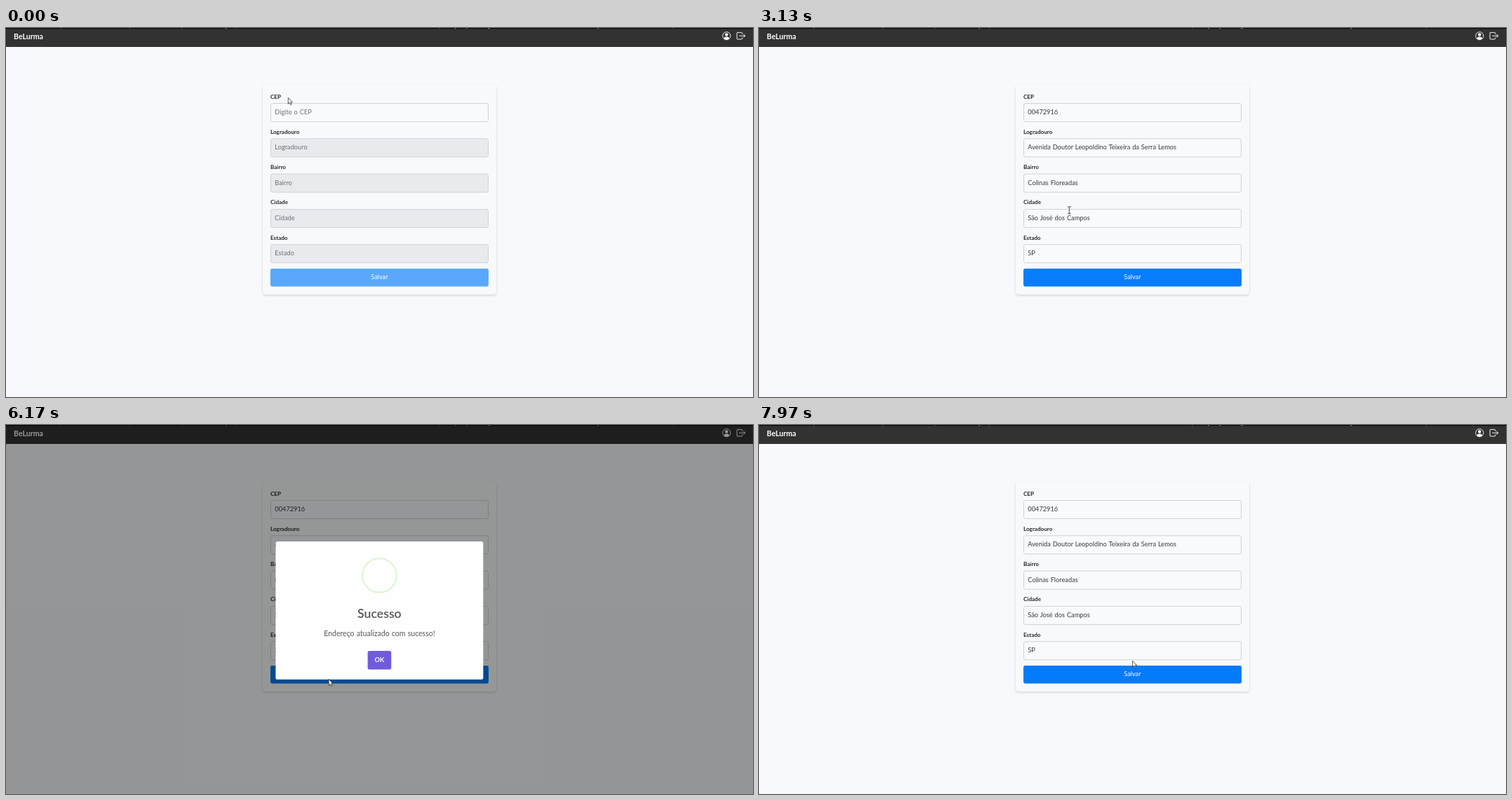
These frames come from a looping animation (1065x526 px, 8 s). An HTML page:

```html
<!DOCTYPE html>
<html lang="pt-BR">
<head>
<meta charset="utf-8">
<title>Endereço</title>
<style>
  html, body { margin: 0; width: 100%; height: 100%; overflow: hidden; background: #f7f9fc; }
  svg { display: block; width: 100vw; height: 100vh; }
  text { font-family: Lato, "Open Sans", sans-serif; word-spacing: .06em; white-space: pre; }
  .brand { font-size: 10.6px; font-weight: 700; fill: #fff; }
  .label { font-size: 8.1px; font-weight: 700; fill: #222529; }
  .value { font-size: 9.25px; }
  .mid { text-anchor: middle; }
</style>
</head>
<body>
<svg viewBox="0 0 1065 526">
  <defs>
    <filter id="soft" x="-5%" y="-5%" width="110%" height="112%">
      <feDropShadow dx="0" dy="1.4" stdDeviation="1.5" flood-color="#000" flood-opacity=".17"/>
    </filter>
  </defs>
  <rect width="1065" height="526" fill="#f7f9fc"/>

  <rect width="1065" height="27" fill="#323232"/>
  <rect width="1065" height="1.2" fill="#080808"/>
  <path d="M78 .5h1m97 0h1m73 0h1m62 0h2m13 0h1m288 0h1m22 0h2m14 0h2m29 0h3m153 0h2m106 0h1" stroke="#777" stroke-width="1"/>
  <text class="brand" x="11" y="15.6">BeLurma</text>
  <g fill="#fff">
    <circle cx="1027.3" cy="11.2" r="5.6" fill="none" stroke="#fff" stroke-width=".9"/>
    <circle cx="1027.3" cy="9.5" r="2.2"/>
    <path d="M1023.2 15.1c.6-1.8 2.1-2.6 4.1-2.6s3.5.8 4.1 2.6a5.8 5.8 0 0 1-8.2 0z"/>
  </g>
  <path d="M1049.6 8.6V7.2q0-.8-.8-.8h-5.9q-.8 0-.8.8v8q0 .8.8.8h5.9q.8 0 .8-.8v-1.4M1045.6 11.2h8.2M1051.6 9l2.2 2.2-2.2 2.2"
    fill="none" stroke="#fff" stroke-width=".95" stroke-linecap="round" stroke-linejoin="round"/>

  <rect x="366" y="81" width="333" height="298.7" rx="4.4" fill="#f8f9fa" filter="url(#soft)"/>
  <g id="form"></g>
  <rect id="save" x="377" y="343" width="311" height="25.4" rx="2.4"/>
  <text class="value mid" x="532.4" y="358.2" fill="#fff">Salvar</text>

  <rect id="shade" width="1065" height="526"/>
  <g id="popup">
    <rect x="390.2" y="169.8" width="284.4" height="189.2" rx="2.8" fill="#fefefe"/>
    <circle cx="532.4" cy="216.4" r="23.3" fill="none" stroke="#a5dc86" stroke-opacity=".33" stroke-width="2.2"/>
    <rect id="tip" fill="#a5dc86" rx="1.1"/>
    <rect id="long" fill="#a5dc86" rx="1.1"/>
    <text class="mid" x="532.4" y="275" font-size="17" font-weight="600" fill="#565656">Sucesso</text>
    <text class="mid" x="532.4" y="299.8" font-size="10.1" fill="#555">Endereço atualizado com sucesso!</text>
    <rect x="516.3" y="319.8" width="32.3" height="25.5" rx="2.2" fill="#705cda"/>
    <text class="mid" x="532.4" y="335" font-size="8.9" font-weight="700" fill="#fff">OK</text>
  </g>

  <g id="cursor" stroke-linejoin="round">
    <path id="arrow" d="M.3 .4V9.2L2.3 7.4 3.7 10.5 5.1 9.9 3.8 6.9H6.4z" fill="#fff" stroke="#222" stroke-width=".75"/>
    <path id="beam" d="M-2.4-5.2h1.7q.7 0 .7.7q0-.7.7-.7h1.7M-2.4 4.8h1.7q.7 0 .7-.7q0 .7.7.7h1.7M0-4.5V4.1" fill="none" stroke="#333" stroke-width=".9"/>
    <path id="hand" d="M-1 5.4V.7q0-.8.8-.8t.8.8v3l3.4.7q1 .2.9 1.2L4.5 9.3q-.2 1.2-1.2 1.2H.6L-2.8 7q-.4-.6.2-1 .5-.4 1.6.8z" fill="#fff" stroke="#222" stroke-width=".75"/>
  </g>
</svg>
<script>
const LOOP = 8000, STEP = 100 / 3;
const TYPE_FROM = 900, TYPE_TO = 1600, FOCUS = 600, BLUR = 2000, FILL = 2250;
const SHADE_IN = 6050, POP_IN = 6060, POP_OUT = 7560, POP_GONE = 7710;
const EM = 8.88;

const rows = [
  ['CEP', 'Digite o CEP', '00472916'],
  ['Logradouro', 'Logradouro', 'Avenida Doutor Leopoldino Teixeira da Serra Lemos'],
  ['Bairro', 'Bairro', 'Colinas Floreadas'],
  ['Cidade', 'Cidade', 'São José dos Campos'],
  ['Estado', 'Estado', 'SP']
];

// time, x, y
const path = [
  [0, 402, 99], [250, 402, 99], [600, 408, 110.5], [2550, 408, 110.5],
  [3133, 442.3, 260], [3700, 451, 326], [4150, 453, 328], [4633, 454.6, 369.6],
  [5050, 454.6, 369.6], [5400, 458.8, 362], [6067, 458.8, 362],
  [6700, 473.8, 360], [6933, 473.8, 360], [7400, 532.3, 335.8], [LOOP, 532.3, 335.8]
];

// time, button colour reached 150 ms later
const tints = [
  [-200, [90, 168, 251]], [FILL, [8, 125, 251]], [4320, [0, 105, 217]], [4570, [8, 125, 251]],
  [5170, [0, 105, 217]], [5650, [4, 92, 186]], [6067, [4, 123, 251]]
];

// share of the run, top, offset, width in em
const tipKeys = [[0, 1.19, .06, 0], [.54, 1.06, .13, 0], [.7, 2.19, -.38, 3.13], [.84, 3, 1.31, 1.06], [1, 2.875, .8125, 1.5625]];
const longKeys = [[0, 3.375, 2.875, 0], [.65, 3.375, 2.875, 0], [.84, 2.19, 0, 3.44], [1, 2.375, .5, 2.9375]];
const popKeys = [[0, .7], [.45, 1.05], [.8, .95], [1, 1]];

const $ = id => document.getElementById(id);
const set = (el, attrs) => { for (const k in attrs) el.setAttribute(k, attrs[k]); };
const clamp = v => Math.max(0, Math.min(1, v));
const mix = (a, b, p) => a + (b - a) * p;
const smooth = p => p * p * (3 - 2 * p);

// cubic-bezier(.25, .1, .25, 1)
function ease(x) {
  if (x <= 0 || x >= 1) return clamp(x);
  let lo = 0, hi = 1, u = .5;
  for (let i = 0; i < 20; i++) {
    u = (lo + hi) / 2;
    if (.75 * u * (1 - u) + u ** 3 < x) lo = u; else hi = u;
  }
  return .3 * u * (1 - u) ** 2 + 3 * u * u * (1 - u) + u ** 3;
}

function along(keys, t, curve) {
  let i = 0;
  while (i < keys.length - 2 && t >= keys[i + 1][0]) i++;
  const a = keys[i], b = keys[i + 1];
  const p = curve(clamp((t - a[0]) / (b[0] - a[0])));
  return a.slice(1).map((v, k) => mix(v, b[k + 1], p));
}

function add(name, attrs, text) {
  const el = document.createElementNS('http://www.w3.org/2000/svg', name);
  set(el, attrs);
  if (text) el.textContent = text;
  return $('form').appendChild(el);
}

const rowY = i => 107.5 + 50.3 * i;
const glow = add('rect', { x: 375.7, y: 105.7, width: 313.6, height: 29.6, rx: 4, fill: '#b9daff' });
const fields = rows.map(([label], i) => {
  const y = rowY(i);
  add('text', { class: 'label', x: 377, y: y - 7 }, label);
  return {
    box: add('rect', { x: 377.5, y, width: 310, height: 26, rx: 2.4 }),
    text: add('text', { class: 'value', x: 383.3, y: y + 15.4 })
  };
});

function drawForm(t) {
  const focused = t >= FOCUS && t < BLUR;
  const typed = Math.ceil(8 * clamp((t - TYPE_FROM) / (TYPE_TO - TYPE_FROM)));
  glow.style.display = focused ? '' : 'none';
  fields.forEach(({ box, text }, i) => {
    const [, hint, full] = rows[i];
    const value = i ? (t >= FILL ? full : '') : full.slice(0, typed);
    const off = i > 0 && t < FILL;
    set(box, { fill: off ? '#e8eaed' : '#f8fafc', stroke: !i && focused ? '#5590d8' : '#ced3da' });
    text.textContent = value || hint;
    set(text, { fill: value ? '#343a40' : '#6c7075' });
  });

  let i = tints.length - 1;
  while (i > 0 && t < tints[i][0]) i--;
  const to = tints[i][1], from = tints[Math.max(0, i - 1)][1];
  const p = ease((t - tints[i][0]) / 150);
  set($('save'), { fill: `rgb(${to.map((v, k) => Math.round(mix(from[k], v, p)))})` });
}

function drawBar(id, keys, p, right, angle) {
  const [top, side, wide] = along(keys, p, ease).map(v => v * EM);
  const x = right ? 554.6 - side - wide : 510.2 + side;
  const y = 194.2 + top, h = .3125 * EM;
  set($(id), { x, y, width: wide, height: h, transform: `rotate(${angle} ${x + wide / 2} ${y + h / 2})` });
}

function drawPopup(t) {
  const dim = .4 * (ease((t - SHADE_IN) / 100) - ease((t - POP_OUT) / 100));
  set($('shade'), { 'fill-opacity': dim });
  const open = t >= POP_IN && t < POP_GONE;
  $('popup').style.display = open ? '' : 'none';
  if (!open) return;
  const out = ease((t - POP_OUT) / 150);
  const scale = along(popKeys, (t - POP_IN) / 300, ease)[0] * (1 - out / 2);
  set($('popup'), { opacity: 1 - out, transform: `translate(532.4 264.4) scale(${scale}) translate(-532.4 -264.4)` });
  const p = clamp((t - POP_IN) / 750);
  drawBar('tip', tipKeys, p, false, 45);
  drawBar('long', longKeys, p, true, -45);
}

function drawCursor(t) {
  const [x, y] = along(path, t, smooth);
  const inside = (l, top, r, b) => x > l && x < r && y > top && y < b;
  let kind = 'arrow';
  if (t >= SHADE_IN && t < POP_GONE) {
    if (inside(516, 320, 549, 345)) kind = 'hand';
  } else if (rows.some((_, i) => (!i || t >= FILL) && inside(377, rowY(i), 688, rowY(i) + 26))) {
    kind = 'beam';
  } else if (t >= FILL && inside(377, 343, 688, 368.4)) {
    kind = 'hand';
  }
  for (const id of ['arrow', 'beam', 'hand']) $(id).style.display = id === kind ? '' : 'none';
  set($('cursor'), { transform: `translate(${x} ${y})` });
}

function draw(ms) {
  const t = Math.floor((ms % LOOP + 4) / STEP) * STEP % LOOP;
  drawForm(t);
  drawPopup(t);
  drawCursor(t);
}

const start = performance.now();
function tick() {
  draw(performance.now() - start);
  requestAnimationFrame(tick);
}
tick();
</script>
</body>
</html>
```
